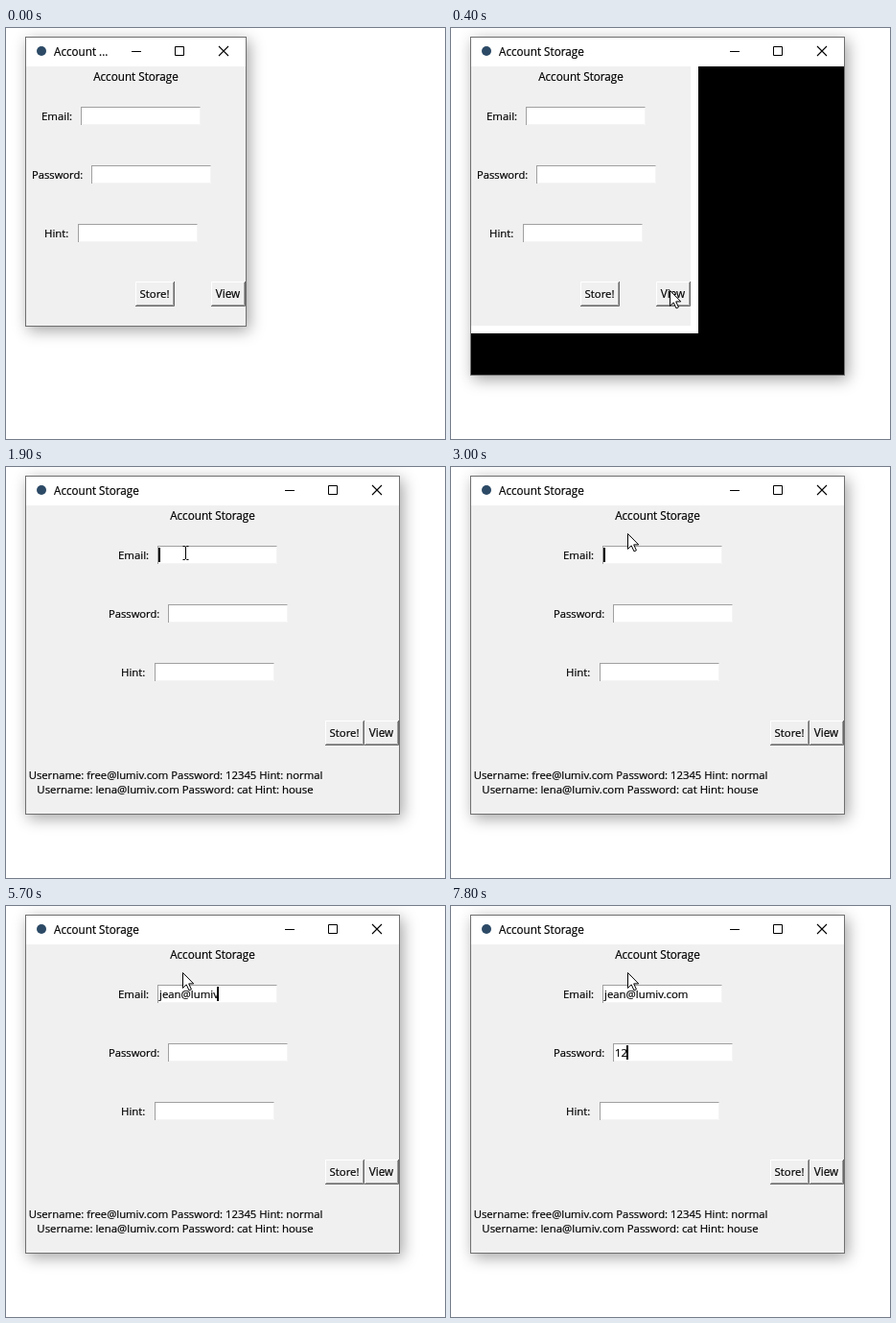
These frames come from a looping animation (458x428 px, 8 s). An HTML page:

```html
<!DOCTYPE html>
<html lang="en">
<head>
<meta charset="utf-8">
<title>Account Storage</title>
<style>
  html, body { margin: 0; width: 100%; height: 100%; overflow: hidden; background: #fff; }
  svg { display: block; }
  text {
    font: 11.4px "Open Sans", "Noto Sans", sans-serif;
    fill: #000; stroke: #000; stroke-width: .2px; white-space: pre;
  }
  .shadow { filter: drop-shadow(3px 4px 8px rgba(0, 0, 0, .36)); }
</style>
</head>
<body>
<svg id="stage" width="458" height="428" viewBox="0 0 458 428"></svg>
<script>
const LOOP = 8000, STEP = 100;
const stage = document.getElementById('stage');
const pen = document.createElement('canvas').getContext('2d');

// Text and the time at which each character is there
const email = 'jean@lumiv.com';
const emailTimes = [4300, 4400, 4500, 4600, 4800, 5000, 5200, 5300, 5500, 5600, 6000, 6300, 6500, 6800];
const password = '12';
const passwordTimes = [7700, 7800];
const TAB = 6900;

// Pointer path: time, x, y
const path = [
  [100, 246, 300], [300, 228, 273], [1200, 228, 273], [1300, 238, 258],
  [1400, 259, 213], [1500, 248, 157], [1600, 215, 110], [1700, 187, 89],
  [2200, 187, 89], [2300, 184, 75], [2500, 180, 61], [2700, 180, 61], [3000, 184, 69]
];

const rect = (x, y, w, h, fill, extra = '') =>
  `<rect x="${x}" y="${y}" width="${w}" height="${h}" fill="${fill}" ${extra}/>`;
const line = (d, color = '#000', width = 1, fill = 'none') =>
  `<path d="${d}" fill="${fill}" stroke="${color}" stroke-width="${width}"/>`;
const text = (s, x, y, anchor = 'start', size = 11.4) =>
  `<text x="${x}" y="${y}" text-anchor="${anchor}" style="font-size:${size}px">${s}</text>`;

function textWidth(s) {
  pen.font = '11.4px "Open Sans", "Noto Sans", sans-serif';
  return pen.measureText(s).width;
}

const typed = (s, times, t) => s.slice(0, times.filter(at => at <= t).length);

function entry(x, y, value, caret) {
  let out = rect(x, y, 125, 19, '#fff') +
    line(`M${x} ${y + .5}h125M${x + .5} ${y}v19`, '#a0a0a0') +
    line(`M${x + 1} ${y + 18.5}h123.5v-18`, '#f4f4f4') +
    text(value, x + 2, y + 14);
  if (caret) out += rect(x + 1 + Math.floor(textWidth(value)), y + 2, 2, 15, '#000');
  return out;
}

function button(label, x, w, size) {
  const y = 264;
  return rect(x, y, w, 26, '#f0f0f0') +
    line(`M${x + .5} ${y + 26}v-25.5h${w - .5}`, '#fff') +
    line(`M${x + 1} ${y + 24.5}h${w - 2.5}v-23.5`, '#a0a0a0') +
    line(`M${x} ${y + 25.5}h${w - .5}v-25.5`, '#696969') +
    text(label, x + w / 2 - .5, y + 17, 'middle', size);
}

function frame(wide) {
  const right = wide ? 410 : 250, bottom = wide ? 361 : 310;
  return rect(20, 9, right - 19, bottom - 8, '#707070', 'class="shadow"') +
    rect(21, 10, right - 21, 30, '#fff') +
    rect(21, 40, right - 21, bottom - 40, '#f0f0f0') +
    '<circle cx="37" cy="24" r="5" fill="#2c4a66"/>' +
    text(wide ? 'Account Storage' : 'Account ...', 50, 29, 'start', 11.7) +
    line(`M${right - 119} 24.5h10M${right - 73.5} 19.5h9v9h-9z`) +
    line(`M${right - 28} 19l10 10m0 -10l-10 10`, '#000', 1.1);
}

function form(t, wide) {
  const dx = wide ? 80 : 0;
  const inEmail = t >= 1900 && t < TAB;
  const typing = t >= 4300 && t < TAB || t >= passwordTimes[0];
  const caretOn = typing || (t - (inEmail ? 1900 : TAB)) % 900 < 600;
  return text('Account Storage', 135.5 + dx, 55, 'middle', 11.7) +
    text('Email:', 37 + dx, 96) +
    text('Password:', 27 + dx, 157, 'start', 11.2) +
    text('Hint:', 40 + dx, 218) +
    entry(78 + dx, 82, typed(email, emailTimes, t), inEmail && caretOn) +
    entry(89 + dx, 143, typed(password, passwordTimes, t), t >= TAB && caretOn) +
    entry(75 + dx, 204, '', false) +
    button('Store!', wide ? 333 : 135, 41, 11.4) +
    button('View', wide ? 374 : 214, 36, 11.7);
}

function pointer(t) {
  if (t < path[0][0]) return '';
  let [, x, y] = path[path.length - 1];
  const next = path.findIndex(p => p[0] > t);
  if (next > 0) {
    const [t0, x0, y0] = path[next - 1], [t1, x1, y1] = path[next];
    const k = (t - t0) / (t1 - t0);
    x = Math.round(x0 + (x1 - x0) * k);
    y = Math.round(y0 + (y1 - y0) * k);
  }
  if (t >= 1700 && t < 2300)
    return line(`M${x - 2.5} ${y - 6.5}h2l1 1l1 -1h2M${x + .5} ${y - 6}v13M${x - 2.5} ${y + 7.5}h2l1 -1l1 1h2`);
  return line(`M${x + .5} ${y + .5}v16l3.7 -3.6l2.8 6l2.4 -1.1l-2.7 -5.9h5z`, '#000', 1, '#fff');
}

function scene(t) {
  const wide = t >= 400, laidOut = t >= 500;
  let out = frame(wide);
  if (wide && !laidOut)
    out += rect(21, 40, 389, 321, '#000') + rect(21, 40, 237, 278, '#fff') + rect(21, 40, 229, 270, '#f0f0f0');
  out += form(t, laidOut);
  if (laidOut)
    out += text('Username: free@lumiv.com Password: 12345 Hint: normal', 177, 325, 'middle', 11.3) +
      text('Username: lena@lumiv.com Password: cat Hint: house', 176.5, 340, 'middle', 11.4);
  return out + pointer(t);
}

let shown = -1;
function draw() {
  const t = Math.floor(performance.now() % LOOP / STEP) * STEP;
  if (t !== shown) stage.innerHTML = scene(shown = t);
  requestAnimationFrame(draw);
}
draw();
</script>
</body>
</html>
```
